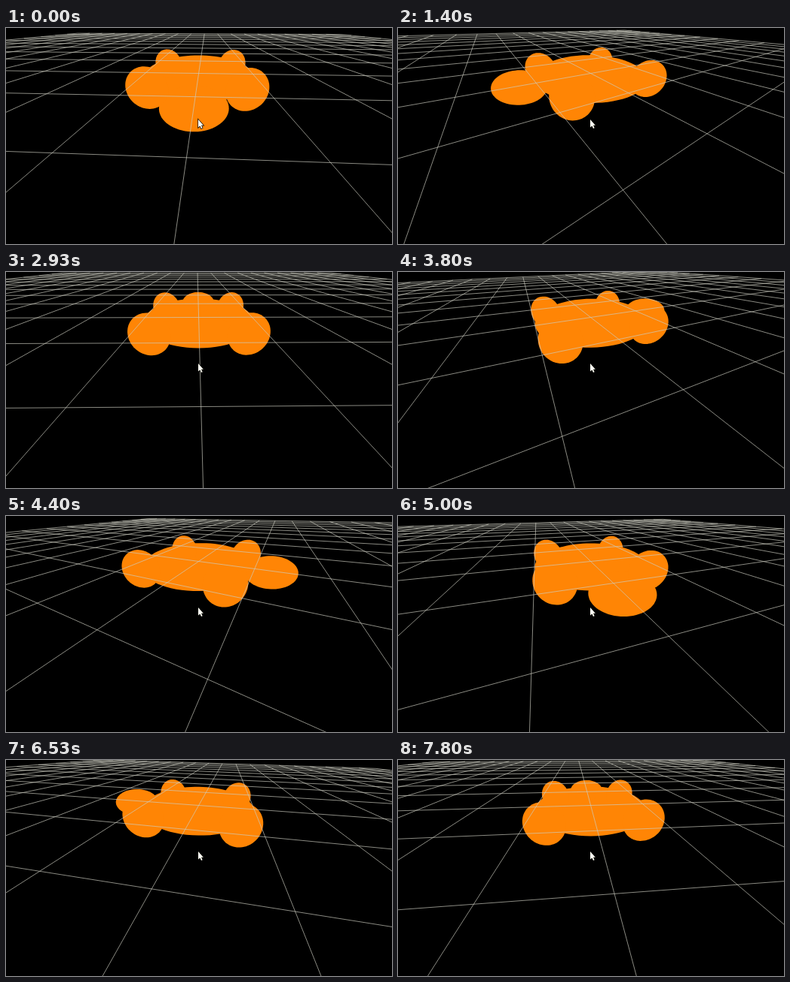
These frames come from a looping animation (512 by 288 pixels, 7870 ms). An HTML page with a canvas:

```html
<!DOCTYPE html>
<html lang="en">
<head>
<meta charset="utf-8">
<title>Turtle on a grid</title>
<style>
  html, body { margin: 0; width: 100%; height: 100%; overflow: hidden; background: #000; }
  canvas { display: block; width: 512px; height: 288px; }
</style>
</head>
<body>
<canvas id="stage" width="512" height="288"></canvas>
<script>
const ctx = document.getElementById('stage').getContext('2d');

const LOOP = 7870, STEP = 200 / 3, LAST = 117;
const FOCAL = 171.7, CX = 255.6, CY = 144, NEAR = 0.05;
const HEIGHT = 0.771, RADIUS = 2.575;  // camera orbit, in grid cells
const PITCH = 42.6 * Math.PI / 180;
const COS_P = Math.cos(PITCH), SIN_P = Math.sin(PITCH);
const TILT = 0.0145;                   // ground leans slightly against the orbit
const CELLS = 10;

// Ellipsoids: centre and radii as [side, up, forward]
const LEG = 0.293, REACH = 0.72, BASE = -0.02;
const turtle = [
  { at: [0, BASE, 0], size: [1, 0.26, 1] },
  { at: [0, BASE, 1.23], size: [0.4, 0.21, 0.38] }
];
for (const side of [-REACH, REACH]) {
  for (const front of [-REACH, REACH]) {
    turtle.push({ at: [side, BASE, front], size: [LEG, LEG, LEG] });
  }
}

// The orbit speeds up, runs evenly, then slows down.
function orbitAngle(s) {
  const speed = 78.9, ramp = 1.38, brake = 5.866;
  let deg = 2.5 + (s < ramp ? speed * s * s / (2 * ramp) : speed * (s - ramp / 2));
  if (s > brake) deg -= 7.64 * (s - brake) ** 2;
  return deg * Math.PI / 180;
}

function makeCamera(angle) {
  const c = Math.cos(angle), s = Math.sin(angle);
  return {
    eye: [RADIUS * s, HEIGHT - TILT * RADIUS * c, RADIUS * c + TILT * HEIGHT],
    view([side, up, fwd]) {
      const f = fwd - TILT * up;
      const drop = HEIGHT - up - TILT * fwd;
      const dist = RADIUS - side * s - f * c;
      return [side * c - f * s, drop * COS_P - dist * SIN_P, dist * COS_P + drop * SIN_P];
    }
  };
}

const toScreen = ([x, y, z]) => [CX + FOCAL * x / z, CY + FOCAL * y / z];

const dot = (a, b) => a[0] * b[0] + a[1] * b[1] + a[2] * b[2];
const cross = (a, b) => [
  a[1] * b[2] - a[2] * b[1],
  a[2] * b[0] - a[0] * b[2],
  a[0] * b[1] - a[1] * b[0]
];
const unit = v => {
  const n = Math.sqrt(dot(v, v));
  return v.map(k => k / n);
};

// Silhouette: the circle of tangent points once the ellipsoid is scaled to a unit sphere
function drawEllipsoid(cam, { at, size }) {
  const e = cam.eye.map((k, i) => (k - at[i]) / size[i]);
  const d2 = dot(e, e);
  const u = unit(cross(e, [0, 1, 0]));
  const w = unit(cross(e, u));
  const r = Math.sqrt(1 - 1 / d2);
  ctx.beginPath();
  for (let n = 0; n < 72; n++) {
    const a = n / 72 * 2 * Math.PI;
    const p = e.map((k, i) =>
      at[i] + size[i] * (k / d2 + r * (u[i] * Math.cos(a) + w[i] * Math.sin(a))));
    ctx.lineTo(...toScreen(cam.view(p)));
  }
  ctx.fill();
}

function drawLine(cam, from, to) {
  let a = cam.view(from), b = cam.view(to);
  if (a[2] > b[2]) [a, b] = [b, a];
  if (b[2] < NEAR) return;
  if (a[2] < NEAR) {
    const k = (NEAR - a[2]) / (b[2] - a[2]);
    a = a.map((v, i) => v + (b[i] - v) * k);
  }
  ctx.beginPath();
  ctx.moveTo(...toScreen(a));
  ctx.lineTo(...toScreen(b));
  ctx.stroke();
}

function drawGrid(cam) {
  ctx.strokeStyle = 'rgba(204, 204, 192, 0.68)';
  ctx.lineWidth = 1;
  for (let i = -CELLS; i <= CELLS; i++) {
    drawLine(cam, [i, 0, -CELLS], [i, 0, CELLS]);
    drawLine(cam, [-CELLS, 0, i], [CELLS, 0, i]);
  }
}

const pointer = new Path2D(
  'M255 122 V132.6 L257.3 130.4 L259 134 L260.6 133.2 L259 129.8 H261.8 Z');

function drawPointer() {
  ctx.strokeStyle = '#000';
  ctx.lineWidth = 1.4;
  ctx.stroke(pointer);
  ctx.fillStyle = '#fffff4';
  ctx.fill(pointer);
}

function render() {
  const t = performance.now() % LOOP;
  const step = Math.min(LAST, Math.floor((t + 3.4) / STEP));
  const cam = makeCamera(orbitAngle(step * STEP / 1000));
  ctx.fillStyle = '#000';
  ctx.fillRect(0, 0, 512, 288);
  ctx.fillStyle = '#ff8505';
  for (const part of turtle) drawEllipsoid(cam, part);
  drawGrid(cam);
  drawPointer();
  requestAnimationFrame(render);
}
render();
</script>
</body>
</html>
```
